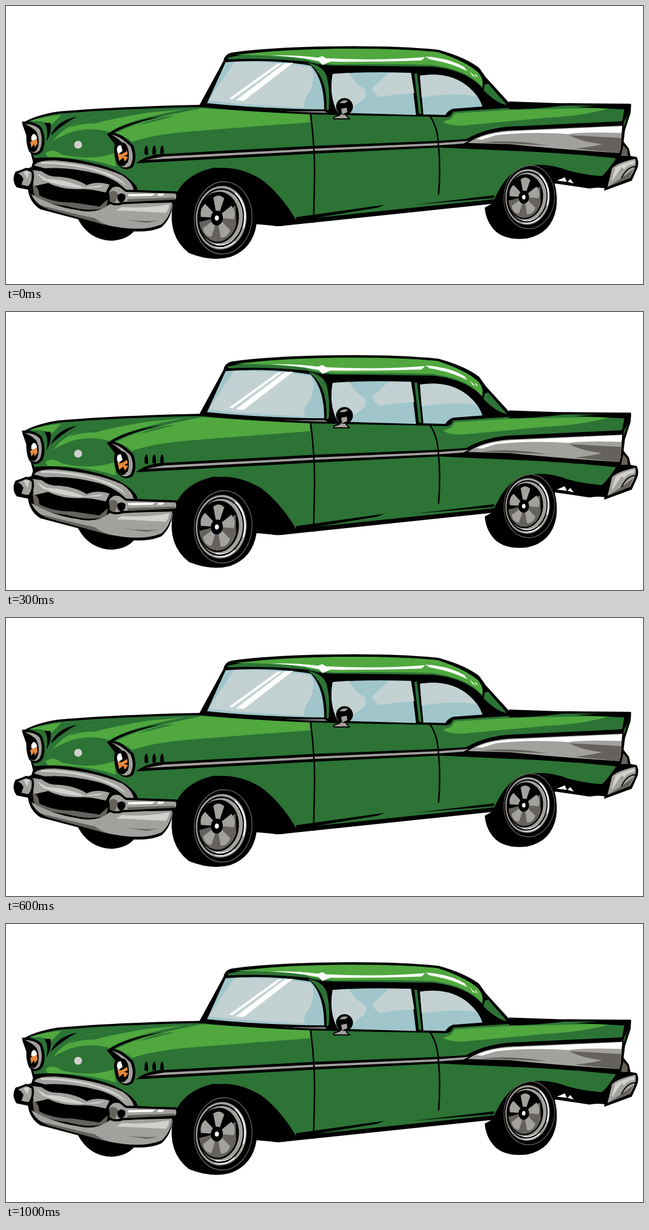
An HTML page that plays this animation: 1131 px wide and 495 px high, repeating every 1100 ms.

```html
<!DOCTYPE html>
<html lang="en">
<head>
<meta charset="utf-8">
<title>Bouncing car</title>
<style>
html, body { margin: 0; width: 100%; height: 100%; overflow: hidden; background: #fff; }
svg { display: block; width: 100vw; height: 100vh; }
.ink { fill: #000; }
.dark { fill: #2c7335; }
.light { fill: #50a83f; }
.glass { fill: #c3d1d2; }
.tint { fill: #a0c6cb; }
.steel { fill: #a3a19d; }
.shade { fill: #65625d; }
.pale { fill: #d2d1ce; }
.white { fill: #fff; }
.amber { fill: #e58a3c; }
.edge { stroke: #000; stroke-width: 4; stroke-linejoin: round; }
.line { fill: none; stroke: #000; stroke-width: 2.6; stroke-linecap: round; stroke-linejoin: round; }
.thin { stroke-width: 2; }
</style>
</head>
<body>
<svg viewBox="0 0 1131 495" preserveAspectRatio="none">
<defs>
  <path id="spoke" class="steel" d="M-8-20L-22-62Q0-78 22-62L8-20Z"/>
  <g id="wheel">
    <circle cx="8" r="115" fill="none" stroke="#66635e" stroke-width="3"/>
    <circle r="101" class="steel"/>
    <path d="M50-84A98 98 0 0 1 94 28L84 26A88 88 0 0 0 44-74ZM-16 95A98 98 0 0 0 62 74L55 66A86 86 0 0 1-14 84Z" class="white"/>
    <circle cx="-2" r="91" fill="none" stroke="#000" stroke-width="5"/>
    <circle cx="-11" r="82" class="ink"/>
    <path d="M-86 18A76 76 0 0 0 62 18L54-42L-16 0Z" class="shade"/>
    <g id="spokes" transform="translate(-15 0)"></g>
    <circle cx="-17" cy="2" r="24" class="ink"/>
    <circle cx="-17" cy="2" r="8" class="white"/>
  </g>
</defs>
<g id="car">
  <!-- underside and wheel arches -->
  <path class="ink" d="M128 380Q148 417 188 418Q216 416 229 399L300 340L470 330L520 384Q500 392 480 392L440 386L300 300L100 340Z"/>
  <path class="ink" d="M300 335Q330 288 388 286Q440 290 475 330L516 382L868 345Q885 290 925 285L1000 290L1080 285L1068 325Q1050 322 1036 325L975 316L940 380L866 352L514 389L484 392L440 388L310 390Z"/>
  <path class="white" d="M978 311L992 305L996 313ZM997 313L1002 308L1008 316Z"/>

  <!-- body -->
  <path class="dark edge" d="M31 210Q50 197 92 190Q190 181 345 178Q450 188 541 191L735 194L784 195L792 186L893 178L1000 175L1108 176L1107 190L1097 221L1094 246L1084 273Q1068 298 1058 305Q1028 303 998 295Q950 277 915 291Q885 310 868 346L514 383Q484 333 450 309Q388 273 334 306Q312 323 303 342L232 330L50 278L38 230Z"/>
  <path class="light" d="M84 240Q104 210 160 198L318 184Q225 200 184 224Q150 215 118 224Q98 231 84 240Z"/>
  <path class="light" d="M70 262Q84 252 98 264L118 268Q158 274 192 262L195 286Q145 269 74 269Z"/>
  <path class="light" d="M190 229Q235 203 348 182Q450 189 539 193L540 207Q420 216 320 224Q257 230 224 242L215 235Z"/>
  <path class="light" d="M42 205Q62 197 98 194L78 214L70 207Q58 204 42 205Z"/>
  <path class="dark" d="M113 217Q130 200 195 194L258 189Q185 201 160 209Q130 209 113 217ZM236 212Q270 197 300 196Q270 204 236 212Z"/>
  <path class="light" d="M790 201L797 191L895 185L1035 182L1076 181Q1030 195 960 199L810 213Q785 213 776 206Z"/>
  <path class="ink" d="M72 241Q76 218 68 208L79 208Q82 224 72 241ZM79 231Q90 204 126 197Q100 211 79 231ZM182 227Q210 206 278 196Q215 211 188 228ZM893 170L1010 174Q960 183 893 184ZM1010 180L1108 174L1105 190Q1098 208 1093 209L1098 184Z"/>
  <circle class="pale" cx="128" cy="247" r="7"/>

  <!-- roof and pillars -->
  <path class="ink" d="M342 179L386 98Q388 86 400 83Q460 74 570 72Q690 70 768 78Q815 91 840 110L852 127L893 172L900 181L794 188Q790 199 778 198L745 197L580 194Q572 190 566 188Q450 188 342 179Z"/>
  <path class="dark" d="M394 92Q440 81 520 78Q680 74 766 82Q818 99 839 119Q849 132 846 146Q817 114 758 108L590 106Q556 106 535 99Q460 92 394 95Z"/>
  <path class="light" d="M406 87Q500 77 590 76Q700 75 766 82Q815 98 838 118Q850 132 844 143Q819 113 756 105Q680 102 585 104Q548 101 530 94Q470 87 406 87Z"/>
  <path class="white" d="M470 88Q520 87 554 92L562 89L568 93Q660 98 744 91L738 97Q650 100 576 99L562 105L555 98Q515 90 470 88ZM745 90Q788 93 814 109L819 116Q790 101 752 95ZM823 116L833 126L829 125ZM833 120L838 127L834 125Z"/>
  <path class="dark" d="M850 140L856 138L889 176Q872 174 848 150ZM536 101Q562 106 569 124Q576 150 573 184L569 186Q572 124 536 101Z"/>

  <!-- windows -->
  <path class="tint" d="M390 100Q470 94 541 106Q565 131 565 184Q450 183 357 173Z"/>
  <path class="glass" d="M405 100Q470 98 541 109Q552 126 538 155Q527 166 530 181L410 174L360 168Z"/>
  <path class="white" d="M396 165L483 102L490 102L402 166ZM408 168L495 102L510 101L422 169Z"/>
  <path class="tint" d="M580 121Q640 116 719 119L728 194L590 190Q573 160 580 121Z"/>
  <path class="glass" d="M580 121L609 119Q620 139 637 148Q644 160 632 168L606 187L588 188Q573 160 580 121ZM650 146Q666 132 679 119L719 119L725 155Q690 157 664 162Q655 158 650 146Z"/>
  <path class="tint" d="M735 124Q788 116 822 145Q840 160 846 179L793 183Q784 187 780 194L741 193Z"/>
  <path class="glass" d="M735 124Q788 116 822 145L836 160Q790 154 738 163Z"/>
  <path class="dark" d="M724 120L731 121L738 192L732 192Z"/>
  <path class="line thin" d="M724 120L732 192M731 121L739 192"/>

  <!-- side trim -->
  <path class="ink" d="M231 280Q245 268 270 264L545 249L770 240L817 237Q848 219 890 215L1097 205L1093 272Q970 260 900 258L770 252L546 263Z"/>
  <path class="steel" d="M248 274L280 268L546 254L770 244L822 240L812 245L770 248L546 258Z"/>
  <path class="steel" d="M820 244Q845 226 890 222L1094 213L1091 262Q980 255 895 246Z"/>
  <path class="white" d="M835 237Q860 225 900 223L1094 214L1093 226Q1020 224 1000 228Q930 223 870 230L845 238Z"/>
  <path class="shade" d="M1000 230L1092 235L1091 262L1010 254Q1045 250 1058 246Q1020 241 1000 230ZM844 243Q900 237 960 248L895 245Z"/>
  <path class="dark" d="M1011 264L1082 272L1078 279Z"/>
  <path class="line" d="M541 193Q548 248 548 300L546 385M752 195Q767 216 768 250Q772 290 768 335"/>
  <path class="ink" d="M515 376L672 354L660 359L515 383ZM724 354L867 337L866 342Z"/>
  <path class="ink" d="M246 264Q245 250 250 248Q253 254 252 266ZM260 264Q259 250 264 248Q267 254 266 265ZM274 263Q273 250 278 248Q281 254 280 264Z"/>

  <!-- mirror -->
  <path class="steel edge thin" d="M595 187L593 194L582 198L582 201L610 201L604 195L605 187Z"/>
  <circle class="ink" cx="601" cy="179" r="15"/>
  <path class="steel" d="M592 173Q598 166 607 169L602 173ZM595 183L605 181L606 189L597 193Z"/>

  <!-- rear bumper -->
  <path class="ink" d="M1096 241L1106 254L1109 267L1120 269Q1125 280 1120 291L1111 311L1062 329L1066 296L1086 272Z"/>
  <path class="shade" d="M1096 248L1103 256L1104 267L1092 267Z"/>
  <path class="steel" d="M1076 289Q1085 279 1117 272Q1122 282 1108 306L1068 322Z"/>
  <path class="pale" d="M1082 288Q1097 279 1116 275L1115 281Q1101 283 1098 291L1093 287L1078 309L1075 311Z"/>
  <path class="shade" d="M1093 306L1114 291L1107 306L1070 321Z"/>
  <path class="line thin" d="M1093 306Q1102 287 1117 286"/>

  <!-- wheels -->
  <path class="ink" d="M296 352Q308 302 368 288Q435 287 472 332L510 382L484 391L445 388Q438 433 398 447Q365 456 325 440Q286 410 296 352Z"/>
  <path class="ink" d="M850 359L866 350Q878 313 904 294Q940 282 967 300Q981 325 977 360Q969 405 925 414Q888 418 869 401Q852 384 850 359Z"/>
  <use href="#wheel" transform="translate(382 377) rotate(4) scale(.445 .56)"/>
  <use href="#wheel" transform="translate(926 340) rotate(4) scale(.39 .49)"/>

  <!-- headlights -->
  <path class="ink" d="M28 206Q50 204 63 216Q73 239 65 258Q53 272 41 259Q34 242 37 226Z"/>
  <path class="steel" d="M33 210Q51 210 60 220Q67 240 60 256Q52 266 44 258L55 255Q60 238 54 224Q46 215 33 210Z"/>
  <ellipse class="ink" cx="49" cy="241" rx="9" ry="19"/>
  <path class="white" d="M45 233Q50 222 55 234L54 242L45 239Z"/>
  <path class="amber" d="M43 242L55 236L56 245L51 252L50 246L45 252Z"/>
  <path class="ink" d="M179 228Q187 221 208 232L226 248Q234 270 225 287Q209 297 197 280Q190 264 193 246Z"/>
  <path class="steel" d="M187 229Q203 232 221 250Q229 268 221 284Q211 291 203 284L216 279Q222 261 211 248Q199 235 187 229Z"/>
  <ellipse class="ink" cx="207" cy="264" rx="11" ry="21"/>
  <path class="white" d="M197 257Q197 247 204 248L207 258L199 264Z"/>
  <path class="amber" d="M198 263L205 264L215 258L216 264L210 267L217 269L211 277L208 270L201 276Z"/>

  <!-- front bumper -->
  <path class="ink" d="M45 287L50 271Q95 266 151 279Q208 291 231 320L234 328L302 331Q309 338 305 348L295 354Q294 378 276 394Q252 405 210 400Q164 394 129 380L61 362Q42 350 39 327L19 323Q9 310 17 295Z"/>
  <path class="steel" d="M50 284Q56 274 88 275Q162 281 207 302Q224 314 227 328L213 329Q201 311 167 300Q115 286 69 289Z"/>
  <path class="pale" d="M62 278Q120 276 180 297Q204 307 214 320Q189 302 145 290Q95 280 62 281Z"/>
  <path class="steel" d="M46 292L63 294Q76 305 95 304Q125 307 143 319Q162 311 184 318L177 332Q152 326 137 326Q100 328 75 315L49 321Z"/>
  <path class="pale" d="M54 297L72 308Q102 308 139 323L174 319L165 323L128 324Q91 320 65 309Z"/>
  <path class="shade" d="M47 318Q59 322 59 337Q83 350 119 350L166 357L181 344L178 359Q148 368 107 356Q72 353 50 338Z"/>
  <path class="steel" d="M45 335Q83 357 125 363Q160 372 184 353L202 352L295 350Q293 374 276 389Q250 400 207 395Q168 390 137 377L71 360Q52 352 45 335Z"/>
  <path class="pale" d="M205 358Q250 361 290 353Q289 362 284 368Q240 366 196 364Z"/>
  <path class="shade" d="M62 355Q116 369 158 378Q171 389 200 395L162 386L75 362ZM193 378Q240 385 271 382L250 386Z"/>
  <path class="steel edge" d="M19 297L36 290L47 295Q50 314 40 323L21 319Q13 307 19 297Z"/>
  <path class="ink" d="M17 298Q26 297 31 308L27 319L20 319Q13 308 17 298Z"/>
  <path class="pale" d="M31 295L42 294L38 307Z"/>
  <path class="steel edge" d="M181 331Q187 316 203 321L213 329L302 332Q307 339 302 346L207 351Q193 356 183 349Z"/>
  <path class="shade" d="M184 331Q195 326 199 336L194 350L184 348ZM216 344L300 341L298 345L215 349Z"/>
  <path class="ink" d="M198 337Q205 330 212 337Q213 348 204 350Q196 347 198 337Z"/>
  <path class="white" d="M216 335L265 334L260 338L218 339ZM271 334L281 334L278 338L268 338Z"/>
</g>
</svg>
<script>
const spokes = document.getElementById("spokes");
for (let i = 0; i < 5; i++) {
  const spoke = document.createElementNS("http://www.w3.org/2000/svg", "use");
  spoke.setAttribute("href", "#spoke");
  spoke.setAttribute("transform", `rotate(${i * 72})`);
  spokes.append(spoke);
}

// Suspension height, held for 100 ms each, in units of 1.75 px
const heights = [0, 6, -3, 3, -3, 2, -4, 2, -3, 1, -2];
const car = document.getElementById("car");
const start = performance.now();
function draw() {
  const step = Math.floor((performance.now() - start) / 100) % heights.length;
  car.setAttribute("transform", `translate(0 ${heights[step] * 1.75})`);
  requestAnimationFrame(draw);
}
draw();
</script>
</body>
</html>
```
